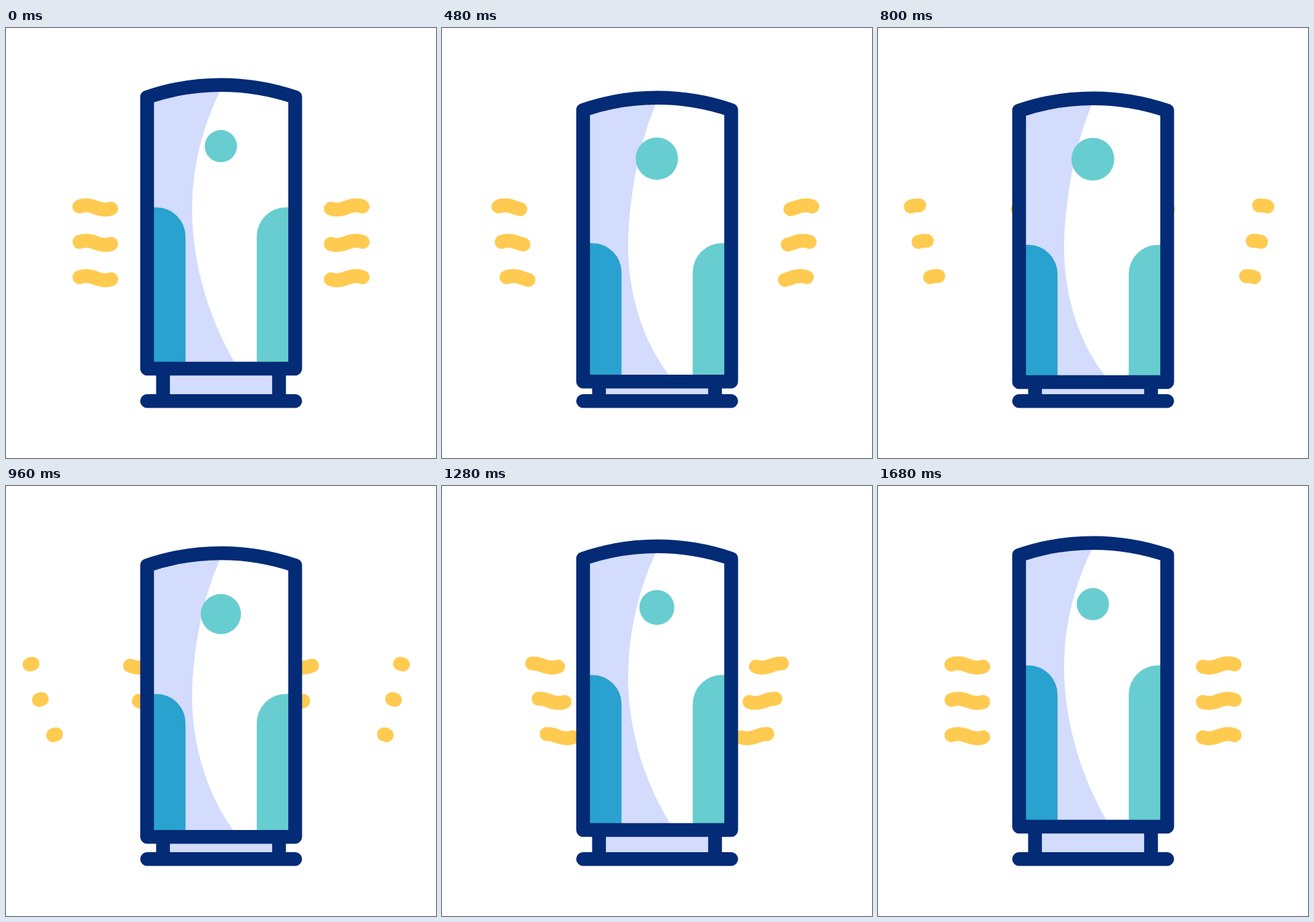
These frames come from a looping animation (640 px wide and 640 px high, 2000 ms). An HTML page:

```html
<!DOCTYPE html>
<html lang="en">
<head>
<meta charset="utf-8">
<title>Air purifier</title>
<style>
  html, body { margin: 0; width: 100%; height: 100%; overflow: hidden; background: #fff; }
  svg { display: block; width: 100vw; height: 100vh; }
  .line { fill: none; stroke: #032b76; stroke-width: 20.5; stroke-linecap: round; stroke-linejoin: round; }
  .wave { fill: none; stroke: #ffca50; stroke-width: 20.7; stroke-linecap: round; }
</style>
</head>
<body>
<svg viewBox="0 0 640 640">
  <g id="waves"></g>
  <rect x="233" y="500" width="174" height="55" fill="#d3dcfd"/>
  <path class="line" style="stroke-linecap:butt" d="M233.7 507V555M406.4 507V555"/>
  <path class="line" d="M210 555.2H430.4"/>
  <path id="back" fill="#fff"/>
  <path id="shade" fill="#d3dcfd"/>
  <path id="left" fill="#29a2cf"/>
  <path id="right" fill="#67cdd0"/>
  <circle id="lamp" cx="319.8" fill="#67cdd0"/>
  <path id="shell" class="line"/>
</svg>
<script>
const STEP = 40, LOOP = 2000;
const NS = 'http://www.w3.org/2000/svg';
const $ = id => document.getElementById(id);
const ease = (t, a, b) => {
  const u = Math.min(1, Math.max(0, (t - a) / (b - a)));
  return u * u * (3 - 2 * u);
};

// Smooth curve through [time, value] points, flat at both ends.
function track(pts) {
  const n = pts.length - 1;
  const rate = i => (pts[i + 1][1] - pts[i][1]) / (pts[i + 1][0] - pts[i][0]);
  const slope = pts.map((p, i) => {
    if (i === 0 || i === n) return 0;
    const before = p[0] - pts[i - 1][0], after = pts[i + 1][0] - p[0];
    return (after * rate(i - 1) + before * rate(i)) / (before + after);
  });
  return t => {
    if (t <= pts[0][0]) return pts[0][1];
    if (t >= pts[n][0]) return pts[n][1];
    let i = 0;
    while (t > pts[i + 1][0]) i++;
    const [t0, a] = pts[i], [t1, b] = pts[i + 1];
    const h = t1 - t0, u = (t - t0) / h, v = 1 - u;
    return a * (1 + 2 * u) * v * v + b * u * u * (3 - 2 * u)
      + h * u * v * (slope[i] * v - slope[i + 1] * u);
  };
}

const rise = track([[15.5, 1], [24, .664], [29, .39], [36, .047], [40.5, 0]]);
const press = t => t < 15.5 ? ease(t, 2, 15.5) : rise(t);

const WAVE = 'M109.3 265.8C116 263 124 263.5 133 267S150 271.5 156.5 268.8';
// Outward travel on each side, and the inward approach of the next wave.
const rows = [
  { out: [81.5, 66], enter: track([[15, 76], [24, 50.5], [29, 29], [36, 3.2], [39.5, 0]]) },
  { out: [66.2, 53], enter: track([[16, 90], [24, 63.5], [29, 40], [36, 10], [41, 0]]) },
  { out: [43, 39.6], enter: track([[17, 102], [24, 77], [29, 53], [36, 19], [42, 0]]) }
];

function addWave() {
  const el = document.createElementNS(NS, 'path');
  el.setAttribute('class', 'wave');
  el.setAttribute('d', WAVE);
  $('waves').append(el);
  return el;
}

const waves = [];
rows.forEach((row, i) => [0, 1].forEach(side =>
  waves.push({ row, side, y: i * 52.6, leaving: addWave(), coming: addWave() })));
const length = waves[0].leaving.getTotalLength();

function placeWave(el, side, x, y, size, skip) {
  el.style.display = size > .01 ? '' : 'none';
  el.setAttribute('transform', (side ? 'translate(640 0) scale(-1 1) ' : '') + `translate(${x} ${y})`);
  el.setAttribute('stroke-dasharray', `${size} 400`);
  el.setAttribute('stroke-dashoffset', -skip);
}

function draw(t) {
  const k = press(t), d = 23 * k, mid = 271 + 64 * k, top = 267 + 64 * k, base = 507 + d;
  const shell = `M210 ${103 + d}A340 340 0 0 1 430.4 ${103 + d}V${base}H210Z`;
  $('back').setAttribute('d', shell);
  $('shell').setAttribute('d', shell);
  $('shade').setAttribute('d',
    `M210 ${103 + d}L318.5 ${94 + d}C${292 + k} ${148 + 27 * k} 277 ${mid - 63} 277 ${mid}` +
    `C277 ${mid + 85} ${306 + 2 * k} ${443 + 48 * k} 346 ${base}H210Z`);
  $('left').setAttribute('d', `M210 ${top}H224A43.2 43.2 0 0 1 267.2 ${top + 43.2}V${base}H210Z`);
  $('right').setAttribute('d', `M430 ${top}H416.4A43.2 43.2 0 0 0 373.2 ${top + 43.2}V${base}H430Z`);
  $('lamp').setAttribute('cy', 175.8 + 22.3 * k);
  $('lamp').setAttribute('r', 24 + 9 * k);

  const gone = ease(t, 2, 29), shown = length * ease(t, 8, 41);
  for (const w of waves) {
    placeWave(w.leaving, w.side, -w.row.out[w.side] * gone, w.y, length * (1 - gone), 0);
    placeWave(w.coming, w.side, w.row.enter(t), w.y, shown, length - shown);
  }
}

const start = performance.now();
function tick() {
  draw(Math.floor((performance.now() - start) % LOOP / STEP));
  requestAnimationFrame(tick);
}
tick();
</script>
</body>
</html>
```
